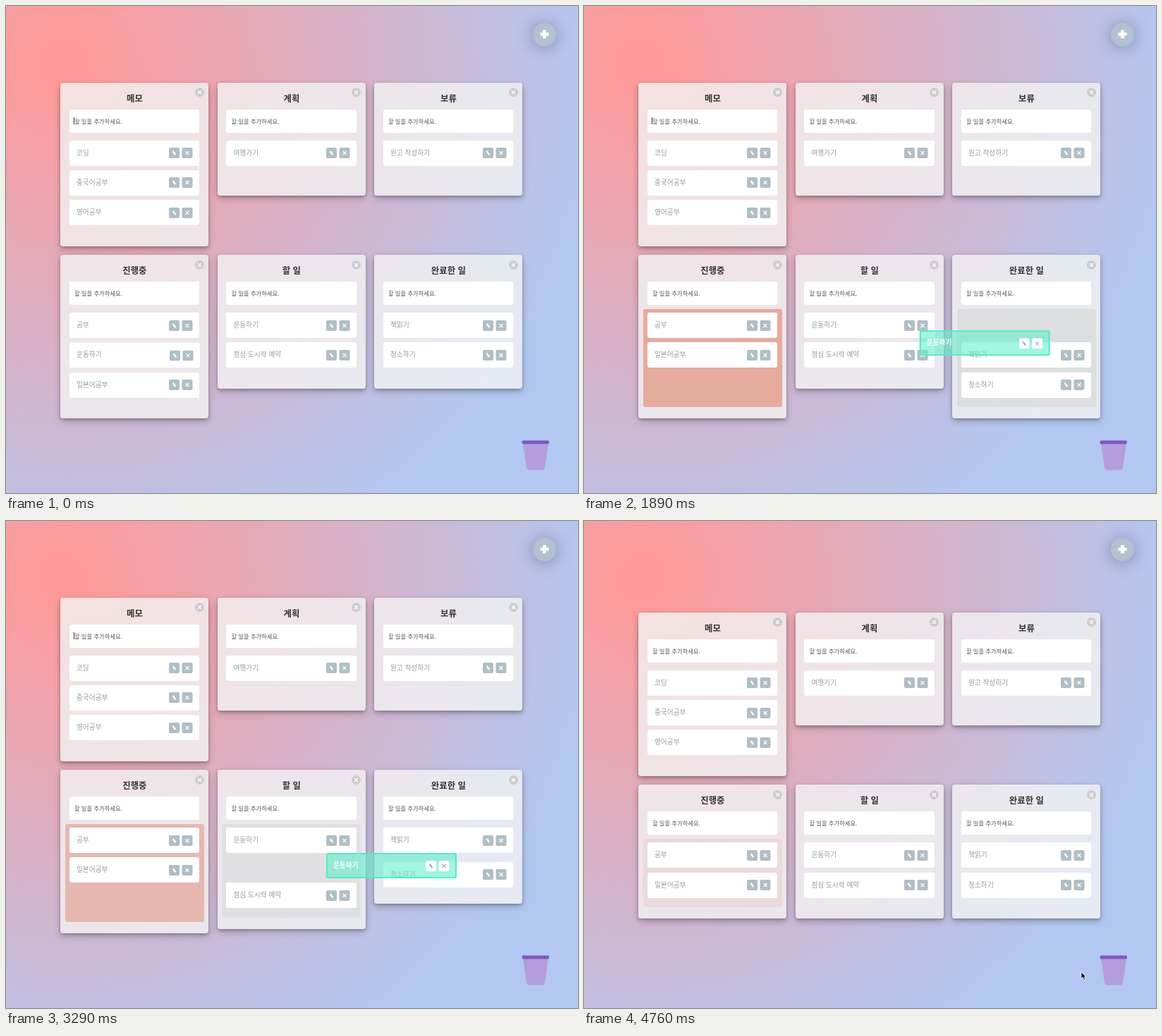
Animation of 811 by 691 pixels, one loop 4.9 s. Source, as an HTML page:

```html
<!DOCTYPE html>
<html lang="ko">
<head>
<meta charset="utf-8">
<style>
  html, body { margin: 0; width: 100%; height: 100%; overflow: hidden; }
  body {
    position: relative;
    background: radial-gradient(circle 765px at 81px 80px, #ff9a9a 4%, #b2c8f2);
    font-family: "Noto Sans CJK KR", "Noto Sans CJK", "Noto Sans CJK JP", sans-serif;
  }
  div, svg { position: absolute; box-sizing: border-box; }
  .column {
    width: 210px; border-radius: 4px; background: rgba(243, 243, 243, .8);
    box-shadow: 0 2px 4px rgba(0, 0, 0, .24), 0 4px 11px rgba(0, 0, 0, .2);
  }
  .title {
    top: 12px; width: 100%; line-height: 20px; text-align: center;
    font-size: 12.4px; font-weight: 700; color: #333;
  }
  .input, .item { left: 12.5px; width: 184.5px; border-radius: 3px; background: #fff; white-space: pre; }
  .input { top: 38px; height: 33px; padding-left: 7px; line-height: 32px; font-size: 8.3px; color: #555; }
  .area { left: 6.5px; top: 76.5px; width: 197px; border-radius: 3px; }
  .item {
    height: 36px; padding-left: 10px; line-height: 35px; font-size: 9.7px; color: #999;
    --button: #b0bec5; --icon: #fff;
  }
  .item svg { left: 141.5px; top: 10.5px; }
  .close { left: 190.5px; top: 7.5px; }
  #card { left: 0; top: 0; }
  #card.dragged {
    --button: #fff; --icon: #9fb5b5;
    background: rgba(101, 238, 202, .6); box-shadow: inset 0 0 0 2px #55eac4;
    color: #fff; font-weight: 700;
  }
  #card.dragged svg { left: 141px; }
  #caret { left: 96px; width: 1px; height: 10px; background: #333; }
  #add {
    left: 746.5px; top: 23.5px; width: 33px; height: 33px; border-radius: 50%;
    background: #b2c0d0; box-shadow: 0 2px 20px 3px rgba(70, 80, 140, .36);
  }
  #halo {
    left: 716px; top: 600px; width: 70px; height: 70px; border-radius: 50%;
    background: rgba(225, 218, 230, .38);
  }
</style>
</head>
<body>
<div id="add"><svg width="33" height="33"><path d="M16.5 10v12M10.5 16H22.5" stroke="#fff" stroke-width="4.6"/></svg></div>
<div id="halo"></div>
<svg id="bin" style="left:0;top:0" width="811" height="691">
  <g id="litter">
    <path d="M740 617L753 608L770 617Z" fill="#ff8a70"/>
    <path d="M738 617L742 612L750 612L756 617Z" fill="#ffa78f"/>
  </g>
  <path d="M733 620H769L764 655Q763 658.500 760 658.500H742Q739 658.500 738 655Z" fill="#b39ddb"/>
  <rect x="731.500" y="616.500" width="38.500" height="5" rx="2" fill="#7e57c2"/>
</svg>
<div id="board"></div>
<div id="caret"></div>
<svg id="cursor" style="left:704px;top:639px" width="10" height="14">
  <path d="M1 1V10.500L3.300 8.500L5 12L6.800 11.200L5.200 7.900H8Z" fill="#111" stroke="#fff" stroke-width=".8"/>
</svg>
<script>
const LOOP = 4900, FRAME = 70, LAST = 4760;
const STEP = 42.2, FIRST_ITEM = 82, ROW_ONE = 232, ROW_GAP = 12.5, MIDDLE = 347;
const LIFT = 700, DROPPED = 4510;
const HOME = 3, TODO = 4, DONE = 5, NONE = -1;

const lists = [
  ['메모', '코딩', '중국어공부', '영어공부'],
  ['계획', '여행가기'],
  ['보류', '원고 작성하기'],
  ['진행중', '공부', '일본어공부'],
  ['할 일', '운동하기', '점심 도시락 예약'],
  ['완료한 일', '책읽기', '청소하기'],
];

// Time, list under the dragged card, index of the gap
const hovers = [
  [0, HOME, 1], [770, TODO, 1], [838, TODO, 0], [1150, DONE, 0], [2106, DONE, 1],
  [2130, NONE, 0], [2152, TODO, 0], [2420, HOME, 1], [3045, TODO, 1], [3274, DONE, 1], [3560, NONE, 0],
];

// Time, left, top of the dragged card
const route = [
  [770, 120, 470], [840, 195, 460], [980, 322, 452.5], [1150, 425, 440],
  [1260, 505, 426], [1330, 528, 420], [1400, 530, 435], [1540, 511.5, 469.5], [1750, 497, 465],
  [1960, 465, 458], [2130, 424, 453], [2240, 357.5, 452], [2420, 200, 468], [2590, 105, 478],
  [2870, 85, 476], [3045, 200, 474], [3290, 454, 471], [3430, 538, 484], [3560, 570, 520],
  [3780, 616, 612], [3850, 619, 620], [4200, 619, 620], [4480, 705, 610],
];

const byId = id => document.getElementById(id);
const clamp = v => Math.min(1, Math.max(0, v));
const easeOut = p => 1 - (1 - p) ** 2;
const smooth = p => p * p * (3 - 2 * p);
const show = (id, on) => byId(id).style.visibility = on ? 'visible' : 'hidden';

const buttons = `<svg width="34" height="15">
  <g fill="var(--button)"><rect width="15" height="15" rx="2"/><rect x="18.500" width="15" height="15" rx="2"/></g>
  <g stroke="var(--icon)"><path d="M5.600 5L9.300 10" stroke-width="2.400"/>
  <path d="M23.500 5l5 5m0-5l-5 5" stroke-width="1.200"/></g></svg>`;
const closeIcon = `<svg class="close" width="13" height="13"><circle cx="6.500" cy="6.500" r="6.500" fill="#ccc"/>
  <path d="M4 4l5 5m0-5l-5 5" stroke="#fff" stroke-width="1.200"/></svg>`;
const itemHtml = (text, id = '') => `<div class="item" ${id}>${text}${buttons}</div>`;

byId('board').innerHTML = lists.map(([title, ...items], n) => `
  <div class="column" style="left:${77.4 + n % 3 * 222.5}px">
    <div class="area"></div><div class="title">${title}</div>${closeIcon}
    <div class="input">할 일을 추가하세요.</div>${items.map(text => itemHtml(text)).join('')}
  </div>`).join('') + itemHtml('운동하기', 'id="card"');

const columns = [...document.querySelectorAll('.column')].map(el => ({
  el, area: el.querySelector('.area'), items: [...el.querySelectorAll('.item')],
}));
const card = byId('card');

// Follows a list of [time, value] entries, easing only where the value changes
const settle = (entries, now, duration, ease) => entries
  .filter(([, to], i) => i && to !== entries[i - 1][1])
  .reduce((v, [at, to]) => v + (to - v) * ease(clamp((now - at) / duration)), entries[0][1]);

function along(path, now) {
  const i = path.findIndex(key => key[0] > now);
  if (i < 0) return path.at(-1).slice(1);
  if (i === 0) return path[0].slice(1);
  const [t0, x0, y0] = path[i - 1], [t1, x1, y1] = path[i];
  const p = (now - t0) / (t1 - t0);
  return [x0 + (x1 - x0) * p, y0 + (y1 - y0) * p];
}

function extraRoom(n, now) {
  if (n < HOME) return 0;
  const changes = n === HOME ? [[0, 1], [4530, 0]]
    : hovers.map(([at, list]) => [list === n ? at + 30 : at, +(list === n)]);
  return settle(changes, now, 200, easeOut);
}

function areaColours(n, now) {
  const over = hovers.map(([at, list]) => [Math.max(at, LIFT), +(list === n)]);
  const grey = n < HOME ? 0 : settle([[0, 0], ...over], now, 350, smooth);
  const away = [...hovers.map(([at, list]) => [at, +(list !== HOME)]), [DROPPED, 0]];
  const red = n === HOME ? settle(away, now, 350, smooth) : 0;
  const tint = `rgba(230,171,159,${red})`;
  return `linear-gradient(${tint},${tint}), rgba(221,222,224,${grey})`;
}

function draw(now) {
  const heights = columns.map(({ items }, n) =>
    Math.max(160, 105.4 + STEP * (items.length + extraRoom(n, now))));
  const top = MIDDLE - (ROW_ONE + ROW_GAP + Math.max(...heights.slice(HOME))) / 2;
  const secondRow = top + ROW_ONE + ROW_GAP;

  columns.forEach(({ el, area, items }, n) => {
    el.style.top = (n < HOME ? top : secondRow) + 'px';
    el.style.height = heights[n] + 'px';
    area.style.height = heights[n] - 92.5 + 'px';
    area.style.background = areaColours(n, now);
    items.forEach((item, i) => {
      const shifts = hovers.map(([at, list, gap]) => [at, +(list === n && gap <= i)]);
      item.style.top = FIRST_ITEM + STEP * (i + settle(shifts, now, 200, easeOut)) + 'px';
    });
  });

  const [x, y] = along([[LIFT, 90, secondRow + FIRST_ITEM + STEP], ...route], now);
  card.style.transform = `translate(${x}px,${y}px)`;
  card.classList.toggle('dragged', now >= LIFT);
  show('card', now < DROPPED);

  const overBin = now >= 3710 && now < DROPPED;
  show('halo', overBin);
  show('litter', overBin);
  byId('caret').style.top = top + 49 + 'px';
  show('caret', now < 350 || now >= LIFT && now < 4550);
  show('cursor', now >= LAST);
}

const start = performance.now();
function tick() {
  const elapsed = (performance.now() - start) % LOOP;
  draw(Math.min(LAST, Math.floor(elapsed / FRAME) * FRAME));
  requestAnimationFrame(tick);
}
tick();
</script>
</body>
</html>
```
